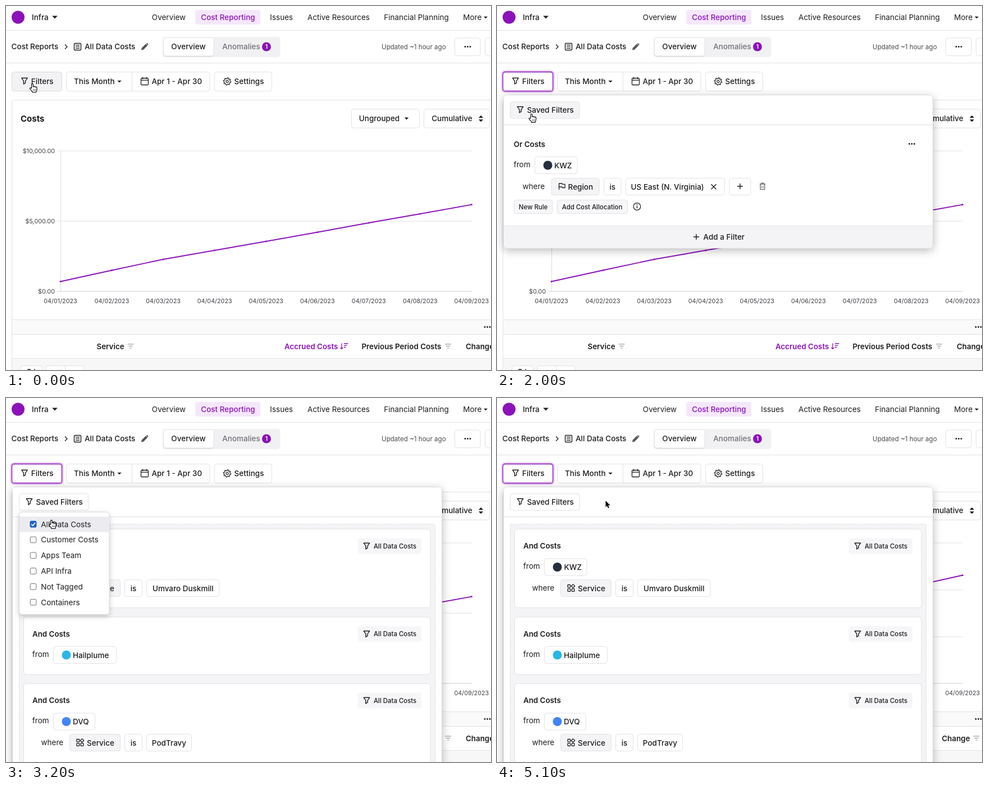
Animation, 864 px wide and 648 px high, one loop 5800 ms. Source, as an HTML page:

```html
<!DOCTYPE html>
<html lang="en">
<head>
<meta charset="utf-8">
<title>Cost report filters</title>
<style>
html, body { margin: 0; width: 100%; height: 100%; overflow: hidden; background: #fff; }
svg { display: block; width: 100vw; height: 100vh; }
text { font-family: Inter, "Open Sans", sans-serif; }
</style>
</head>
<body>
<svg id="stage" viewBox="0 0 864 648" xmlns="http://www.w3.org/2000/svg"></svg>
<script>
const INK = '#1d1d20', GREY = '#71717a', EDGE = '#e2e2e6', SOFT = '#f4f4f6', PURPLE = '#8c12ba';
const LOOP = 5800, STEP = 100;

// Drawing helpers; text is placed by the middle of its capitals
const text = (x, cy, s, size = 13.5, weight = 500, fill = INK, anchor = 'start') =>
  `<text x="${x}" y="${cy + size * 0.364}" font-size="${size}" font-weight="${weight}" fill="${fill}" text-anchor="${anchor}">${s}</text>`;
const mid = (x, cy, s, size, weight, fill) => text(x, cy, s, size, weight, fill, 'middle');
const box = (x, y, w, h, fill = '#fff', stroke = EDGE, r = 4, more = '') =>
  `<rect x="${x}" y="${y}" width="${w}" height="${h}" rx="${r}" fill="${fill}" stroke="${stroke}" ${more}/>`;
const path = (d, stroke = INK, width = 1.3, fill = 'none', more = '') =>
  `<path d="${d}" fill="${fill}" stroke="${stroke}" stroke-width="${width}" stroke-linejoin="round" ${more}/>`;
const dot = (x, y, r, fill) => `<circle cx="${x}" cy="${y}" r="${r}" fill="${fill}"/>`;
const at = (x, y, s) => `<g transform="translate(${x} ${y})">${s}</g>`;
const group = (id, s, more = '') => `<g id="${id}" ${more}>${s}</g>`;
const hline = (x1, x2, y, c = EDGE) => path(`M${x1} ${y}H${x2}`, c, 1);
const dots = (x, y) => [-4.5, 0, 4.5].map(d => dot(x + d, y, 1.4, INK)).join('');

// Icons
const caret = (x, y, w = 4) => path(`M${x - w} ${y - w / 2}h${2 * w}l${-w} ${w}z`, 'none', 0, INK);
const funnel = (x, y) => at(x, y, path('M-5.2 -5.2H5.2L1.6 -.2V3.4L-1.6 5.4V-.2Z', INK, 1.4));
const plus = (x, y, r = 5) => path(`M${x - r} ${y}h${2 * r}M${x} ${y - r}v${2 * r}`, INK, 1.4);
const sieve = (x, y) => path(`M${x - 5.5} ${y - 3.5}h11M${x - 3.5} ${y}h7M${x - 1.5} ${y + 3.5}h3`, '#85858d', 1.2);
const sorter = (x, y) => path(`M${x - 4} ${y - 5}v10m-2.5 -2.5l2.5 2.5l2.5 -2.5M${x} ${y - 4.5}h7.5M${x} ${y - 1.2}h5.5M${x} ${y + 2}h3.5`, PURPLE, 1.3);
const page = (x, y) => at(x, y, box(-6, -6, 12, 12, 'none', INK, 1.5, 'stroke-width="1.4"') + path('M-3.5 -2.8h7M-3.5 0h7M-3.5 2.8h7', INK, 1.2));
const pencil = (x, y) => at(x, y, path('M-5.5 5.5l.8 -3.3l6.8 -6.8l2.6 2.6l-6.8 6.8z', '#55555d', 1, '#55555d') + path('M3 -5.4l1 -1l2.5 2.5l-1 1z', '#55555d', .6, '#55555d'));
const calendar = (x, y) => at(x, y, box(-6.5, -5.5, 13, 12, 'none', INK, 1.5, 'stroke-width="1.3"') + path('M-6.5 -1.8h13M-3.5 -7.5v3.5M3.5 -7.5v3.5', INK, 1.3));
const gear = (x, y) => {
  let d = '';
  for (let i = 0; i < 32; i++) {
    const a = (i + 0.5) / 32 * 2 * Math.PI, r = i % 4 < 2 ? 6.7 : 5;
    d += `${i ? 'L' : 'M'}${(r * Math.cos(a)).toFixed(2)} ${(r * Math.sin(a)).toFixed(2)}`;
  }
  return at(x, y, path(d + 'Z', INK, 1.2) + '<circle r="2.1" fill="none" stroke="#1d1d20" stroke-width="1.2"/>');
};
const flag = (x, y) => at(x, y, path('M-5 6V-5.5M-5 -5H0.5L1 -3.6H5.5V2.5H.8L.3 1H-5', INK, 1.3));
const trash = (x, y) => at(x, y, path('M-3.8 -3.5V5.6H3.8V-3.5M-5 -4H5M-1.8 -4.2V-5.8H1.8V-4.2', '#66666e', 1.3) + path('M-1.3 -1V3.3M1.3 -1V3.3', '#66666e', .9));
const info = (x, y) => `<circle cx="${x}" cy="${y}" r="6.3" fill="none" stroke="${INK}" stroke-width="1.2"/>` +
  path(`M${x} ${y - .8}v4`, INK, 1.4) + dot(x, y - 3, .9, INK);
const tiles = (x, y) => at(x, y, [[-6, -6], [-6, 1.2], [1.2, 1.2]].map(([a, b]) =>
  box(a, b, 4.6, 4.6, 'none', INK, .6, 'stroke-width="1.3"')).join('') + path('M.3 -3.7l3.2 -3.2l3.2 3.2l-3.2 3.2z', INK, 1.3));
const ring = (id, x, y, w, h, edge) => group(id, box(x - 1.5, y - 1.5, w + 3, h + 3, 'none', '#e6c3f6', 5.5, 'stroke-width="3"') +
  box(x, y, w, h, 'none', edge, 4, 'stroke-width="1.3"'));

// Page
function header() {
  return dot(21.5, 20, 11.5, PURPLE) + text(46, 20, 'Infra') + caret(87, 20, 4.8) +
    mid(290, 20, 'Overview', 13.5, 400) + box(337, 7, 116, 26, '#f5e8fd', 'none') +
    mid(395.5, 20, 'Cost Reporting', 13.5, 500, PURPLE) + mid(490.7, 20, 'Issues', 13.5, 400) +
    mid(592.5, 20, 'Active Resources', 13.5, 400) + mid(731, 20, 'Financial Planning', 13.5, 400) +
    text(814.3, 20, 'More', 13.5, 400) + caret(854.5, 20.5, 3.6) + hline(0, 864, 43.5) +
    text(9.6, 72.5, 'Cost Reports') + path('M105 68.5l4 4l-4 4', INK, 1.3) + page(127.5, 72.5) +
    text(140, 72.5, 'All Data Costs') + pencil(247, 72.5) +
    box(279, 55, 209.5, 36, '#f1f1f3', 'none', 5) + box(281, 57, 88.5, 31.5, '#fff', 'none', 4, 'filter="url(#low)"') +
    mid(325, 72.5, 'Overview') + mid(419, 72.5, 'Anomalies', 13.5, 500, GREY) +
    dot(464, 72.5, 8, PURPLE) + mid(464, 72.5, '1', 10.5, 600, '#fff') +
    text(669, 72.5, 'Updated ~1 hour ago', 11.6, 400, '#4b4b52') +
    box(799.5, 57, 45.5, 31.5) + dots(822.5, 72.5) + box(853.5, 57, 45, 31.5) + hline(0, 864, 101.5);
}

function toolbar() {
  return box(10.5, 117.5, 89, 34, '#fff', '#dadade', 4, 'id="filters"') + ring('filtersRing', 10.5, 117.5, 89, 34, PURPLE) +
    funnel(33, 133.5) + text(44.8, 134.5, 'Filters') +
    box(107.5, 117.5, 255.5, 34) + path('M224.5 117.5v34', EDGE, 1) +
    mid(157.3, 134.5, 'This Month') + caret(202, 134.5, 3.7) + calendar(247, 134) + mid(304.3, 134.5, 'Apr 1 - Apr 30') +
    box(371.5, 117.5, 102, 34) + gear(394, 134.3) + mid(433, 134.5, 'Settings');
}

const px = i => 97 + 91.55 * i;
const basePts = [490.5, 470.5, 451, 435, 419, 402.7, 386, 370, 353.6];

function chartCard() {
  const grid = ys => ys.map(y => hline(91, 830, y, '#e2e2e2')).join('');
  const label = (y, s) => text(87, y, s, 10.8, 400, '#3f3f46', 'end');
  return box(10.5, 167.5, 900, 520) + text(26, 200.5, 'Costs', 15, 700) +
    box(615.5, 183.5, 121, 33.5) + mid(665, 200.5, 'Ungrouped') + caret(713.5, 200.5, 3.8) +
    box(744.5, 183.5, 117, 33.5) + mid(794.5, 200.5, 'Cumulative') +
    path('M842 199l4 -4.2l4 4.2zM842 202l4 4.2l4 -4.2z', 'none', 0, INK) +
    group('gridOld', grid([258, 383]) + label(258, '$10,000.00') + label(383, '$5,000.00')) +
    group('gridNew', grid([258, 341.5, 425]) + label(258, '$15,000.00') + label(341.5, '$10,000.00') + label(425, '$5,000.00')) +
    hline(91, 830, 508, '#cfcfcf') + path('M97.5 258V508', '#dcdcdc', 1) + label(508, '$0.00') +
    basePts.map((_, i) => mid(px(i), 525.5, `04/0${i + 1}/2023`, 10.8, 400, '#3f3f46')).join('') +
    path('', PURPLE, 1.9, 'none', 'id="line"') + group('marks', basePts.map(() => dot(0, 0, 1.5, PURPLE)).join(''));
}

function table() {
  const th = (x, s, c) => text(x, 606.5, s, 13.35, 600, c);
  return box(11, 559, 900, 25, '#fafafa', 'none', 0) + hline(11, 864, 558.5) + hline(11, 864, 584.5) + dots(857.5, 571.5) +
    th(161.5, 'Service') + sieve(222, 605.5) + th(496, 'Accrued Costs', PURPLE) + sorter(602, 605.5) +
    group('headOld', th(633.5, 'Previous Period Costs') + sieve(787.5, 605.5) + th(819, 'Change')) +
    group('headNew', th(792.5, 'Change') + sieve(854, 605.5)) +
    box(11, 628, 900, 30, '#f7f7f8', 'none', 0) + hline(11, 864, 627.5) +
    box(26.5, 640.5, 37.5, 30) + path('M39 657v-10h4l3 4M51 646v8', INK, 1.3) +
    box(71.5, 640.5, 67.5, 30) + path('M105.5 640.5v30', EDGE, 1);
}

// Filter panel
const button = (x, y, w, s, fill) => box(x, y, w, 30, fill) + (s ? mid(x + w / 2, y + 15.3, s) : '');
const source = (x, y, w, color, name, left) => button(x, y, w) + dot(x + 23, y + 15, 8, color) + text(left, y + 15.3, name);
const panel = h => box(11.5, 158.5, 765, h, '#fff', '#dcdce0', 6, 'filter="url(#wide)"');

function singleRule() {
  return panel(272.5) +
    text(29.8, 246, 'Or Costs', 13.35, 600) + dots(739, 245.5) + text(29.7, 282.5, 'from', 13.5, 400) +
    source(67.5, 268.5, 75.5, '#252f3e', 'KWZ', 102) + text(45.5, 321, 'where', 13.5, 400) +
    button(97, 306.5, 85, '', SOFT) + flag(115.5, 321) + text(126.6, 321.8, 'Region') +
    button(190.5, 306.5, 30.5, 'is') + button(229.5, 306.5, 176) + text(238.6, 321.8, 'US East (N. Virginia)') +
    path('M381.5 317.2l9 9m0 -9l-9 9', INK, 1.4) + button(414, 306.5, 38) + plus(433, 321) + trash(473, 321) +
    box(30.5, 345.5, 68.5, 24, '#f7f7f9') + mid(64.5, 357.5, 'New Rule', 11.4) +
    box(107, 345.5, 125.5, 24, '#f7f7f9') + mid(169.5, 357.5, 'Add Cost Allocation', 11.4) + info(249.5, 357) +
    path('M12 391.5H776V425q0 5.5 -5.5 5.5H17.5q-5.5 0 -5.5 -5.5z', 'none', 0, SOFT) + hline(12, 776, 391.5) +
    plus(355, 411) + text(367.5, 411.5, 'Add a Filter');
}

function savedRules() {
  const card = (y, h, color, name, w, left, service, sw) =>
    box(31.5, y, 724.5, h) + text(47, y + 30, 'And Costs', 13.35, 600) +
    box(626.5, y + 16, 113.5, 28, '#f6f6f8', 'none') + funnel(642.5, y + 30) + text(655, y + 30.2, 'All Data Costs', 11.4) +
    text(46.8, y + 66, 'from', 13.5, 400) + source(84.5, y + 52.5, w, color, name, left) +
    (service ? text(62.5, y + 104.5, 'where', 13.5, 400) + button(113.5, y + 90, 90, '', SOFT) + tiles(132, y + 105) +
      text(144, y + 105.3, 'Service') + button(211.5, y + 90, 31, 'is') + button(250.5, y + 90, sw, service) : '');
  return panel(560) +
    box(23.5, 224.5, 741, 500, SOFT, '#d3d3d9', 2, 'stroke-dasharray="2 2"') +
    card(233.5, 140, '#252f3e', 'KWZ', 75.5, 119.5, 'Umvaro Duskmill', 129.5) +
    card(390, 102, '#29b5e8', 'Hailplume', 112, 119) +
    card(508.5, 160, '#4285f4', 'DVQ', 74, 119, 'PodTravy', 80);
}

const savedBar = () => hline(12, 776, 211.5) + box(23.5, 170.5, 123.5, 29.5, '#fff', EDGE, 4, 'id="saved"') +
  ring('savedRing', 23, 170, 124.5, 30, '#d9a8ec') + funnel(41.5, 184.5) + text(53.5, 185, 'Saved Filters');

function menu() {
  const names = ['All Data Costs', 'Customer Costs', 'Apps Team', 'API Infra', 'Not Tagged', 'Containers'];
  return box(23.5, 203, 160.5, 182.5, '#fff', '#d6d6da', 5, 'filter="url(#high)"') +
    box(24, 211, 159.5, 27.5, '#ececf0', 'none', 0, 'id="rowHover"') +
    names.map((s, i) => {
      const y = 224.7 + 27.8 * i;
      return box(43.2, y - 5.4, 10.6, 10.6, '#fff', '#6f6f74', 2) + text(62.3, y, s, 13.5, 400);
    }).join('') +
    group('tick', box(42.7, 218.8, 11.6, 11.6, '#1a62cc', 'none', 2) + path('M45.2 224.8l2.5 2.6l4.3 -5.4', '#fff', 1.7));
}

const hand = path('M-1.5 8V1.2a1.35 1.35 0 0 1 2.7 0V5.4a1.2 1.2 0 0 1 2.4 .3a1.2 1.2 0 0 1 2.3 .4a1.1 1.1 0 0 1 2.1 .5V10q0 2 -1.2 3.4V15H-.2V13.6L-4.2 9.2a1.2 1.2 0 0 1 1.8 -1.6z', '#000', 1.1, '#fff') +
  path('M1.6 9.5v3M3.5 9.5v3M5.4 9.5v3', '#000', .6);
const arrow = path('M0 0V11.2L2.6 8.8L4.4 13L6.3 12.2L4.5 8.1H8Z', '#fff', .9, '#000', 'paint-order="stroke"');

const shadow = (id, dy, blur, alpha) => `<filter id="${id}" x="-20%" y="-20%" width="140%" height="150%">
  <feDropShadow dx="0" dy="${dy}" stdDeviation="${blur}" flood-opacity="${alpha}"/></filter>`;

const stage = document.getElementById('stage');
stage.innerHTML = `<defs>${shadow('low', 1, 1.2, .18)}${shadow('high', 3, 5, .2)}${shadow('wide', 4, 8, .27)}</defs>
  <rect width="864" height="648" fill="#fff"/>` +
  header() + chartCard() + table() + toolbar() + group('single', singleRule()) + group('rules', savedRules()) +
  group('bar', savedBar()) + group('menu', menu()) + group('cursor', group('hand', hand) + group('arrow', arrow));

const el = {};
stage.querySelectorAll('[id]').forEach(n => el[n.id] = n);
const show = (id, on) => el[id].setAttribute('display', on ? 'inline' : 'none');

// Pointer stops: time, x, y
const stops = [[0, 47, 138.5], [1200, 47, 138.5], [2100, 62, 194], [2500, 62, 194], [2900, 81, 217.5], [3500, 81, 217.5], [3900, 193.5, 183]];
function pointer(t) {
  const i = stops.findIndex(s => s[0] > t);
  if (i < 0) return stops[stops.length - 1].slice(1);
  const a = stops[i - 1], b = stops[i], u = (t - a[0]) / (b[0] - a[0]), e = u * u * (3 - 2 * u);
  return [a[1] + (b[1] - a[1]) * e, a[2] + (b[2] - a[2]) * e];
}

function render(t) {
  const [x, y] = pointer(t);
  const open = t >= 1200, menuOpen = t >= 2200 && t < 4200, picked = t >= 3100;
  const loaded = t >= 3600, redrawn = t >= 3900;
  const inside = (x0, y0, x1, y1) => x >= x0 && x <= x1 && y >= y0 && y <= y1;
  const onFilters = inside(10, 117, 100, 152), onSaved = open && inside(23, 170, 147, 200);
  const onRow = menuOpen && inside(23, 211, 184, 239);

  el.filters.setAttribute('fill', onFilters ? '#f2f2f5' : '#fff');
  el.saved.setAttribute('fill', onSaved ? SOFT : '#fff');
  show('filtersRing', open);
  show('single', open && !picked);
  show('rules', picked);
  show('bar', open);
  show('savedRing', t >= 2200 && !picked);
  show('menu', menuOpen);
  show('rowHover', onRow);
  show('tick', picked);
  show('headOld', !loaded);
  show('headNew', loaded);
  show('gridOld', !redrawn);
  show('gridNew', redrawn);

  // Quartic ease-out from the old scale to the new
  const u = Math.min(1, Math.max(0, (t - 3910) / 1000)), k = 1 + 0.247 * (1 - (1 - u) ** 4);
  const ys = basePts.map(v => 508 - (508 - v) * k);
  el.line.setAttribute('d', 'M' + ys.map((v, i) => `${px(i)} ${v.toFixed(2)}`).join('L'));
  ys.forEach((v, i) => {
    el.marks.children[i].setAttribute('cx', px(i));
    el.marks.children[i].setAttribute('cy', v);
  });

  const link = onFilters || onSaved || onRow;
  show('hand', link);
  show('arrow', !link);
  el.cursor.setAttribute('transform', `translate(${x} ${y})`);
}

const start = performance.now();
function tick(now) {
  const t = Math.max(0, now - start) % LOOP;
  render(Math.floor(t / STEP) * STEP);
  requestAnimationFrame(tick);
}
render(0);
requestAnimationFrame(tick);
</script>
</body>
</html>
```
